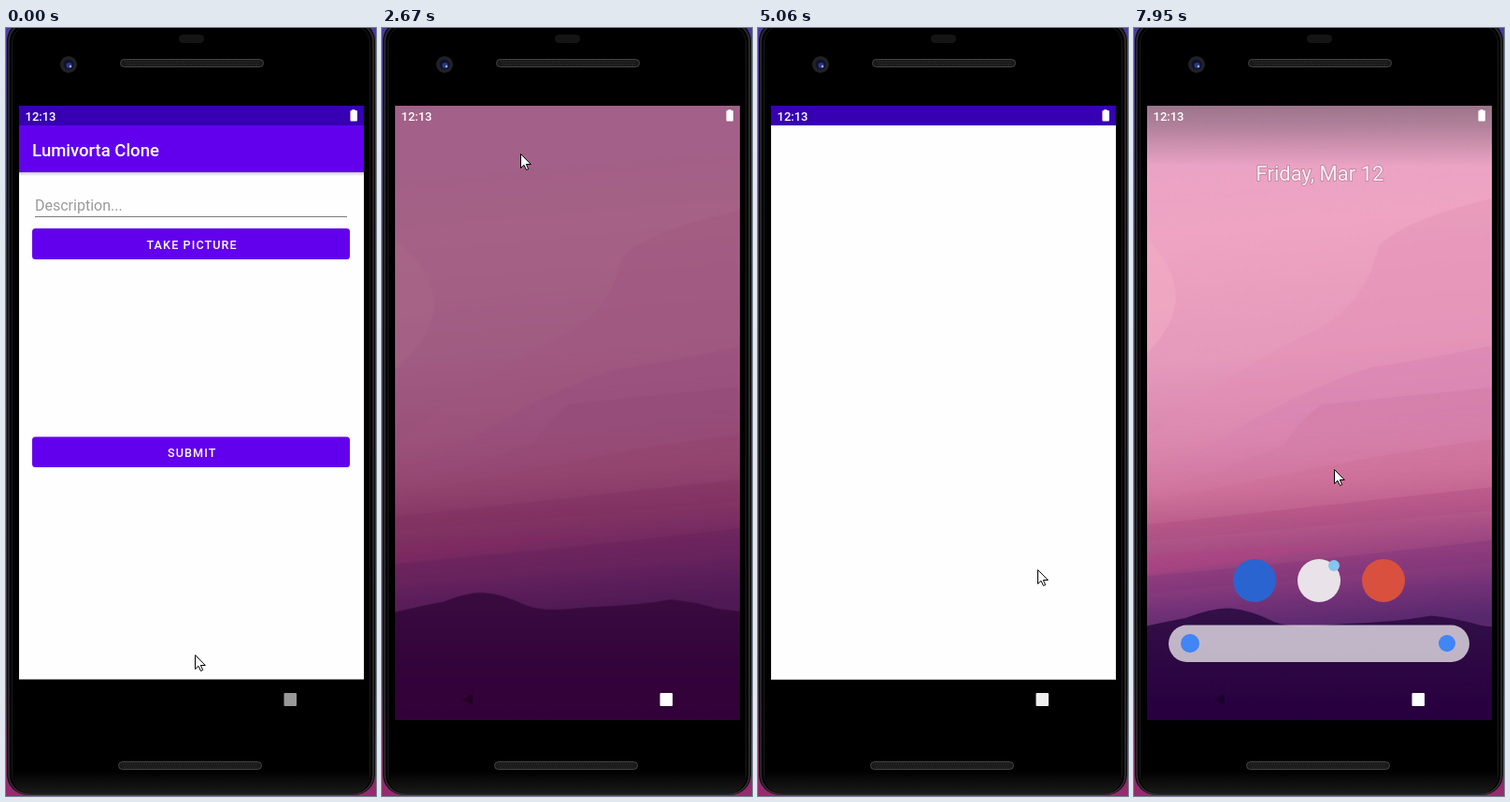
An HTML page for the animation above (8 s loop, 396 by 820 pixels).

```html
<!DOCTYPE html>
<html lang="en">
<head>
<meta charset="utf-8">
<title>Phone demo</title>
<style>
html, body { margin: 0; width: 100%; height: 100%; overflow: hidden; background: #000; }
svg { display: block; font-family: Roboto, "Open Sans", sans-serif; }
.mid { text-anchor: middle; }
.btn { font-weight: 500; font-size: 12.6px; letter-spacing: 1.1px; fill: #fff; }
.label { font-size: 10.8px; fill: #111; text-anchor: middle; }
.day { font-size: 22px; fill: #fbeef4; stroke: #6b4a5c; stroke-opacity: .4; stroke-width: 1.6px; paint-order: stroke; }

.anim { animation: 8s linear infinite; }
#pointer { animation-name: pointer; }
#app { animation-name: app; transform-origin: 198px 389px; }
#splash { animation-name: splash; }
#navBack { animation-name: navBack; }
#ripple { animation-name: ripple; }
#square { animation-name: square; }
#wall { animation-name: wall; transform-origin: 198px 395px; }
#dim { animation-name: dim; }
#launcher { animation-name: launcher; }
#date { animation-name: date; }
#dock { animation-name: dock; }
#sheet { animation-name: sheet; }
#sheetBack { animation-name: sheetBack; }
#grid { animation-name: grid; }

@keyframes pointer {
  0%, 3.49% { transform: translate(202px, 669px); }
  3.5%, 8.5% { transform: translate(217px, 674px); }
  15.6%, 19.1% { transform: translate(300px, 713px); }
  22.4%, 23.4% { transform: translate(298px, 647px); }
  28.75% { transform: translate(165px, 440px); }
  31.7%, 32.8% { transform: translate(150px, 4px); }
  33.3%, 35.1% { transform: translate(148px, 134px); }
  37.5% { transform: translate(172px, 297px); }
  40.3%, 41.9% { transform: translate(166px, 228px); }
  45%, 46.8% { transform: translate(160px, 110px); }
  52.5%, 53.5% { transform: translate(62px, 362px); }
  58.3%, 63.2% { transform: translate(280px, 555px); }
  63.24%, 64.7% { transform: translate(299px, 578px); }
  75.4%, 77.2% { transform: translate(300px, 706px); }
  80.5% { transform: translate(303px, 774px); }
  84.3%, 86.5% { transform: translate(299px, 711px); }
  91.25% { transform: translate(190px, 440px); }
  94.5%, 95.5% { transform: translate(192px, 0); }
  99.3%, 100% { transform: translate(214px, 471px); }
}
@keyframes app {
  0%, 24% { transform: none; opacity: 1; }
  26.5%, 28.75% { transform: translate(0, -14px) scale(.68); opacity: 1; }
  31.7% { transform: translate(0, -560px) scale(.68); opacity: 1; }
  31.75% { transform: translate(0, -560px) scale(.68); opacity: 0; }
  53.5% { transform: translate(-138px, -30px) scale(.12); opacity: 0; }
  54.5% { opacity: 1; }
  57.5%, 87% { transform: none; opacity: 1; }
  89.5%, 91.25% { transform: translate(0, -14px) scale(.68); opacity: 1; }
  94.5% { transform: translate(0, -560px) scale(.68); opacity: 1; }
  94.55%, 100% { transform: translate(0, -560px) scale(.68); opacity: 0; }
}
@keyframes splash {
  0%, 50% { opacity: 0; }
  50.01%, 64.74% { opacity: 1; }
  64.75%, 100% { opacity: 0; }
}
@keyframes navBack {
  0%, 24% { opacity: 1; }
  26%, 54.5% { opacity: 0; }
  57.5%, 87% { opacity: 1; }
  89%, 100% { opacity: 0; }
}
@keyframes ripple {
  0%, 19.1% { opacity: 0; }
  20.5%, 23.6% { opacity: 1; }
  25.5%, 86.4% { opacity: 0; }
  87.5% { opacity: 1; }
  89.5%, 100% { opacity: 0; }
}
@keyframes square {
  0%, 19.1% { fill: #999; }
  20.5%, 58% { fill: #fff; }
  63.2%, 64.7% { fill: #eee; }
  67%, 86.4% { fill: #999; }
  87.5%, 100% { fill: #fff; }
}
@keyframes wall {
  0%, 35.1% { transform: scale(.926); }
  37.5% { transform: scale(1); }
  40.3%, 41.9% { transform: scale(.99); }
  45%, 94.5% { transform: scale(.926); }
  98%, 100% { transform: scale(1); }
}
@keyframes dim {
  0%, 35.1% { opacity: .42; }
  37.2%, 57.5% { opacity: 0; }
  58%, 94.5% { opacity: .42; }
  98%, 100% { opacity: 0; }
}
@keyframes launcher {
  0%, 35.1% { opacity: 0; }
  37.2%, 57.5% { opacity: 1; }
  58%, 95% { opacity: 0; }
  98%, 100% { opacity: 1; }
}
@keyframes date {
  0%, 37.5% { transform: none; opacity: 1; }
  40.3%, 41.9% { transform: translate(0, -13px); opacity: .6; }
  43.5%, 58% { transform: translate(0, -40px); opacity: 0; }
  59%, 100% { transform: none; opacity: 1; }
}
@keyframes dock {
  0%, 37.5% { transform: none; opacity: 1; }
  40.3%, 41.9% { transform: translate(0, -14px); opacity: .45; }
  43%, 58% { transform: translate(0, -40px); opacity: 0; }
  59%, 100% { transform: none; opacity: 1; }
}
@keyframes sheet {
  0%, 37.5% { transform: translate(0, 534px); }
  40.3%, 41.9% { transform: translate(0, 465px); }
  45%, 58% { transform: none; }
  59%, 100% { transform: translate(0, 534px); }
}
@keyframes sheetBack {
  0%, 37.5% { opacity: 0; }
  40.3%, 41.9% { opacity: .18; }
  45%, 58% { opacity: .92; }
  59%, 100% { opacity: 0; }
}
@keyframes grid {
  0%, 38.5% { opacity: 0; }
  40.3%, 58% { opacity: 1; }
  59%, 100% { opacity: 0; }
}
</style>
</head>
<body>
<svg width="396" height="820" viewBox="0 0 396 820">
  <defs>
    <linearGradient id="desk" x2="0" y2="1">
      <stop stop-color="#4a3aa0"/><stop offset=".3" stop-color="#3a3a48"/>
      <stop offset=".85" stop-color="#3a3440"/><stop offset="1" stop-color="#9a2a70"/>
    </linearGradient>
    <linearGradient id="chin" x2="0" y2="1">
      <stop stop-color="#000"/><stop offset="1" stop-color="#1a1a1a"/>
    </linearGradient>
    <linearGradient id="sky" gradientUnits="userSpaceOnUse" x1="175" y1="100" x2="221" y2="640">
      <stop stop-color="#e9a2c6"/><stop offset=".2" stop-color="#eea4c2"/>
      <stop offset=".45" stop-color="#e599bb"/><stop offset=".6" stop-color="#d987ad"/>
      <stop offset=".7" stop-color="#cf7299"/><stop offset=".78" stop-color="#b75a89"/>
      <stop offset=".87" stop-color="#96417f"/><stop offset=".94" stop-color="#723177"/>
      <stop offset="1" stop-color="#58286d"/>
    </linearGradient>
    <linearGradient id="land" x2="0" y2="1">
      <stop stop-color="#331047"/><stop offset=".5" stop-color="#28003f"/><stop offset="1" stop-color="#24003a"/>
    </linearGradient>
    <linearGradient id="shade" x2="0" y2="1">
      <stop stop-color="#504850" stop-opacity=".5"/><stop offset=".35" stop-color="#504850" stop-opacity=".36"/>
      <stop offset="1" stop-color="#504850" stop-opacity="0"/>
    </linearGradient>
    <linearGradient id="drop" x2="0" y2="1">
      <stop stop-opacity=".22"/><stop offset="1" stop-opacity="0"/>
    </linearGradient>
    <linearGradient id="fall" gradientUnits="userSpaceOnUse" x1="0" y1="410" x2="0" y2="530">
      <stop stop-color="#fff"/><stop offset="1" stop-color="#000"/>
    </linearGradient>
    <mask id="fade" maskUnits="userSpaceOnUse" x="-40" y="0" width="480" height="840">
      <rect x="-40" width="480" height="840" fill="url(#fall)"/>
    </mask>
    <clipPath id="screen"><rect x="14" y="83" width="369" height="656"/></clipPath>
    <g id="speaker">
      <rect x=".5" y=".5" width="153" height="8" rx="4" fill="#191919" stroke="#454545"/>
      <path d="M5 3H149M6 6H149" stroke="#383838" stroke-dasharray="1 1.5"/>
    </g>
  </defs>

  <!-- phone body -->
  <rect width="396" height="820" fill="url(#desk)"/>
  <rect x="1" y="-8" width="394" height="827" rx="22" fill="#0d0d0d"/>
  <rect x="3" y="-6" width="390" height="824" rx="21" fill="#000" stroke="#303030" stroke-width="1.5"/>
  <rect x="6.5" y="-3" width="383" height="820" rx="19" fill="#000" stroke="#191919"/>
  <path d="M7 793H389V800Q387 817 370 817H26Q9 817 7 800Z" fill="url(#chin)"/>
  <rect x="185" y="7" width="27" height="9" rx="4.5" fill="#151515"/>
  <use href="#speaker" x="122" y="33"/>
  <use href="#speaker" x="120" y="783"/>
  <circle cx="67" cy="39" r="9" fill="#222226"/>
  <circle cx="67" cy="39" r="5.5" fill="#10122e"/>
  <circle cx="67.5" cy="40" r="3" fill="#2b3a86"/>
  <circle cx="69" cy="41" r="1.2" fill="#a5b4ee"/>

  <g clip-path="url(#screen)">
    <g id="wall" class="anim">
      <rect x="-40" y="20" width="480" height="800" fill="url(#sky)"/>
      <g mask="url(#fade)">
        <path d="M-40 190Q44 230 45 290Q40 340 -40 390Z" fill="#f5b2c6" opacity=".4"/>
        <path d="M440 170Q300 196 262 232Q250 290 200 320Q90 370 -40 480V560H440Z" fill="#e38fb3" opacity=".4"/>
        <path d="M440 326Q330 352 255 362Q180 385 90 440L-40 510V560H440Z" fill="#d281b3" opacity=".4"/>
        <path d="M440 378Q300 392 200 402Q172 425 160 446L-40 518V560H440Z" fill="#cd76a3" opacity=".38"/>
        <path d="M440 432Q250 452 -40 520V560H440Z" fill="#c9668f" opacity=".4"/>
      </g>
      <path d="M440 484Q240 506 -40 536V552Q230 530 440 510Z" fill="#a9487f" opacity=".35"/>
      <path d="M-40 568Q90 553 230 552Q100 572 -40 592Z" fill="#b84080" opacity=".3"/>
      <path d="M440 540Q230 566 -40 590V608Q230 584 440 566Z" fill="#7d3378" opacity=".35"/>
      <path d="M-40 652Q20 636 55 630Q84 618.500 103 619.500Q124 621 150 634Q165 640 190 639L226 636Q275 635 318 627.500Q345 630 372 638L440 646V830H-40Z" fill="url(#land)"/>
    </g>
    <rect id="dim" class="anim" x="14" y="83" width="369" height="656" fill="#400534"/>
    <path d="M86 717L97 711V723Z" opacity=".3"/>

    <g id="launcher" class="anim">
      <rect x="14" y="83" width="369" height="64" fill="url(#shade)"/>
      <g id="date" class="anim">
        <text class="day mid" x="199" y="162.5">Friday, Mar 12</text>
      </g>
      <g id="dock" class="anim">
        <circle cx="129" cy="590" r="23" fill="#2a64d0"/>
        <circle cx="198" cy="590" r="23" fill="#e9e2e9"/>
        <circle cx="214" cy="574" r="6" fill="#86c5ee"/>
        <circle cx="267" cy="590" r="23" fill="#d9503f"/>
      </g>
      <g id="sheet" class="anim">
        <rect id="sheetBack" class="anim" x="14" y="83" width="369" height="680" rx="14" fill="#fff"/>
        <rect x="37" y="103.5" width="322" height="39.5" rx="19.7" fill="#fff" opacity=".7"/>
        <circle cx="60" cy="123" r="10" fill="#4285f4"/>
        <circle cx="335" cy="123" r="9" fill="#4285f4"/>
        <g id="grid" class="anim"></g>
      </g>
    </g>

    <rect id="navBack" class="anim" x="14" y="695" width="369" height="44"/>
    <g id="app" class="anim">
      <rect x="14" y="83" width="369" height="612.5" fill="#fefefe"/>
      <rect x="14" y="83" width="369" height="21" fill="#3700b3"/>
      <rect x="14" y="154" width="369" height="4" fill="url(#drop)"/>
      <rect x="14" y="104" width="369" height="50" fill="#6200ee"/>
      <text x="28" y="136.5" font-size="18.5" font-weight="500" fill="#fff">Lumivorta Clone</text>
      <text x="31" y="195" font-size="16" fill="#9a9a9a">Description...</text>
      <path d="M31 201.5H365" stroke="#7c7c7c"/>
      <rect x="28" y="214" width="340" height="33" rx="3.5" fill="#6200ee"/>
      <text class="btn mid" x="199.2" y="235.5">TAKE PICTURE</text>
      <rect x="28" y="436.5" width="340" height="32.5" rx="3.5" fill="#6200ee"/>
      <text class="btn mid" x="199.2" y="458">SUBMIT</text>
      <rect id="splash" class="anim" x="14" y="104" width="369" height="591.5" fill="#fefefe"/>
    </g>

    <rect id="ripple" class="anim" x="256.5" y="695.5" width="95.5" height="43.5" rx="21.5" fill="#1c1c1c"/>
    <rect id="square" class="anim" x="297.5" y="710" width="13.5" height="14" rx="1"/>
    <text x="20.5" y="98.5" font-size="13" font-weight="500" fill="#fff">12:13</text>
    <path d="M370.5 88V87H373.5V88H375Q376 88 376 89V98.500Q376 99.500 375 99.500H369.500Q368.500 99.500 368.500 98.500V89Q368.500 88 369.500 88Z" fill="#fff"/>
  </g>

  <g id="pointer" class="anim">
    <path d="M.5 .5V15.500L4 12.300L6.500 17.500L8.700 16.500L6.300 11.500H11.300Z" fill="#fff" stroke="#000"/>
  </g>
</svg>
<script>
const apps = [
  ["Schedule", "#fff"], ["Lenses", "#4285f4"], ["Browse", "#d9503f"], ["Timer", "#4a89f0"], ["Callbook", "#fff"],
  ["Locker", "#fff"], ["Calls", "#1a73e8"], ["Folders", "#4285f4"], ["Letters", "#fff"], ["Lookup", "#fff"],
  ["Lumivorta", "#3ddc84"], ["Routes", "#36a55a"], ["Notes", "#2a64d0"], ["Dialer", "#1a73e8"], ["Albums", "#f4bd30"]
];
document.getElementById("grid").innerHTML = apps.map(([name, color], i) => {
  const x = 60 + 69 * (i % 5), y = 185 + 87 * Math.floor(i / 5);
  return `<circle cx="${x}" cy="${y}" r="23" fill="${color}"/><text class="label" x="${x}" y="${y + 44}">${name}</text>`;
}).join("");
</script>
</body>
</html>
```
